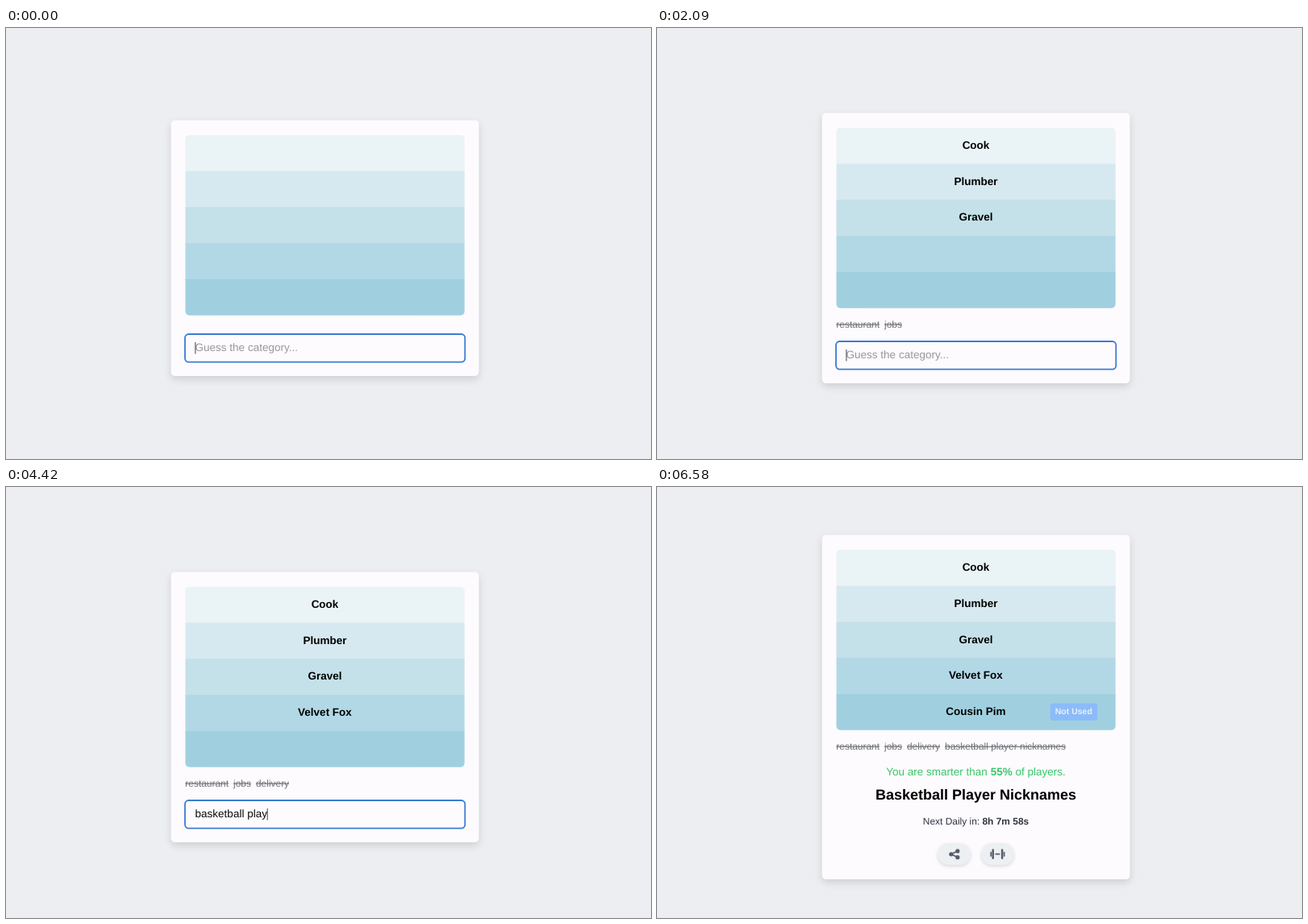
Recreate the animation shown at these times as an HTML page. Size 800 by 535 pixels, loop 6.61 s.

```html
<!DOCTYPE html>
<html lang="en">
<head>
<meta charset="utf-8">
<title>Guess the category</title>
<style>
  html, body { margin: 0; height: 100%; overflow: hidden; background: #edeef2; }
  svg { display: block; width: 100%; height: 100%; }
  text { font: 13.5px "Liberation Sans", Arial, sans-serif; white-space: pre; text-rendering: geometricPrecision; }
  .mid { text-anchor: middle; }
  .bold { font-weight: bold; }
  .small { font-size: 11.95px; }
  #card { fill: #fdfbfe; filter: drop-shadow(0 4px 5px rgba(0, 0, 0, .13)); }
  #guesses { fill: #70727a; }
  #guesses tspan { text-decoration: line-through; }
  .pill { fill: #edf0f2; filter: drop-shadow(0 2px 2px rgba(0, 0, 0, .13)); }
  .icon { fill: #575d6b; stroke: #575d6b; }
</style>
</head>
<body>
<svg viewBox="0 0 800 535">
  <clipPath id="round"><rect x="222.5" y="18.3" width="346.2" height="224" rx="5"/></clipPath>
  <g id="board">
    <rect id="card" x="204.7" width="381.8" rx="5"/>
    <g id="bands" clip-path="url(#round)"></g>
    <g id="clues"></g>
    <text id="guesses" class="small" x="222.3" y="266.5"></text>

    <g id="field">
      <rect x="222" width="347.3" height="34.6" rx="4.5" fill="#fdfbfe" stroke="#3c7cd3" stroke-width="1.8"/>
      <text id="typed" x="234.6" y="21.2"></text>
      <rect id="caret" y="10" width="1" height="14.5" fill="#444"/>
    </g>

    <g id="result">
      <rect x="487.7" y="209" width="58.6" height="21.2" rx="3" fill="#8cbbf9"/>
      <text class="mid bold" x="516.8" y="222.7" fill="#e8f0fc" style="font-size:10.5px">Not Used</text>
      <text class="mid" x="395.5" y="298.3" fill="#37c669">You are smarter than <tspan class="bold">55%</tspan> of players.</text>
      <text class="mid bold" x="395.5" y="328" style="font-size:18px">Basketball Player Nicknames</text>
      <text class="mid small" x="395.5" y="359.3" fill="#2f3540">Next Daily in: <tspan class="bold" id="timer"></tspan></text>
      <rect class="pill" x="348" y="382.5" width="41" height="27" rx="13.5"/>
      <rect class="pill" x="402" y="382.5" width="41" height="27" rx="13.5"/>
      <g class="icon" transform="translate(362 390)">
        <path d="M10.8 2.3L3 6.3L10.8 10.3" fill="none" stroke-width="1.7"/>
        <g stroke="none">
          <circle cx="10.8" cy="2.4" r="2.6"/>
          <circle cx="2.8" cy="6.3" r="2.6"/>
          <circle cx="10.8" cy="10.2" r="2.6"/>
        </g>
      </g>
      <g class="icon" transform="translate(422.4 396.2)" stroke-linecap="round">
        <path d="M-8.2 -2.2V2.2M8.2 -2.2V2.2" stroke-width="1.7"/>
        <path d="M-5.7 -5.1V5.1M5.7 -5.1V5.1" stroke-width="2.5"/>
        <path d="M-2.2 0H2.2" stroke-width="1.7"/>
      </g>
    </g>
  </g>
</svg>
<script>
const LOOP = 6610, BLINK = 250, TICK = 6095, CENTER = 395.5;
const ROW = 44.8, BANDS_TOP = 18.3;
const clues = ["Cook", "Plumber", "Gravel", "Velvet Fox", "Cousin Pim"];
const colors = ["#eaf3f6", "#d7e9f0", "#c4e0e9", "#b2d8e6", "#a0d0df"];
// start: first key, step: time per key, submit: enter
const guesses = [
  { text: "restaurant", start: 120, step: 52, submit: 800 },
  { text: "jobs", start: 1350, step: 50, submit: 1860 },
  { text: "delivery", start: 2130, step: 54, submit: 3150 },
  { text: "basketball player nicknames", start: 3690, step: 52, submit: 5470 }
];
const layouts = {
  empty: { top: 114.4, height: 317.6, field: 265.6 },
  playing: { top: 105.4, height: 335.5, field: 283.6 },
  done: { top: 59.5, height: 427.5, field: 0 }
};

const $ = id => document.getElementById(id);
const show = (el, on) => el.setAttribute("visibility", on ? "visible" : "hidden");

function add(parent, tag, attrs, text = "") {
  const el = document.createElementNS("http://www.w3.org/2000/svg", tag);
  for (const key in attrs) el.setAttribute(key, attrs[key]);
  el.textContent = text;
  return parent.appendChild(el);
}

function setText(el, text) {
  if (el.textContent !== text) el.textContent = text;
}

colors.forEach((fill, i) => add($("bands"), "rect",
  { x: 222, y: BANDS_TOP + i * ROW, width: 348, height: ROW + 1, fill }));
const clueEls = clues.map((word, i) => add($("clues"), "text",
  { class: "mid bold", x: CENTER, y: BANDS_TOP + 26.2 + i * ROW }, word));
const guessEls = guesses.map((g, i) => add($("guesses"), "tspan", { dx: i ? 6 : 0 }, g.text));

function draw(t) {
  const sent = guesses.filter(g => t >= g.submit).length;
  const done = sent === guesses.length;
  const layout = done ? layouts.done : sent ? layouts.playing : layouts.empty;
  $("board").setAttribute("transform", `translate(0 ${layout.top})`);
  $("card").setAttribute("height", layout.height);
  clueEls.forEach((el, i) => show(el, t >= (i ? guesses[i - 1].submit : 30)));
  guessEls.forEach((el, i) => show(el, i < sent));

  $("field").setAttribute("transform", `translate(0 ${layout.field})`);
  $("field").style.display = done ? "none" : "";
  show($("result"), done);
  setText($("timer"), t < TICK ? "8h 7m 59s" : "8h 7m 58s");
  if (done) return;

  const { text, start, step } = guesses[sent];
  const keys = Math.max(0, Math.min(text.length, Math.floor((t - start) / step) + 1));
  const lastEvent = keys ? start + (keys - 1) * step : sent ? guesses[sent - 1].submit : 0;
  const typed = $("typed");
  setText(typed, keys ? text.slice(0, keys) : "Guess the category...");
  typed.setAttribute("fill", keys ? "#0b0b0d" : "#97979c");
  $("caret").setAttribute("x", 234.4 + (keys ? typed.getComputedTextLength() : 0));
  show($("caret"), (t - lastEvent) % (2 * BLINK) < BLINK);
}

const begin = performance.now();
function frame() {
  draw((performance.now() - begin) % LOOP);
  requestAnimationFrame(frame);
}
frame();
</script>
</body>
</html>
```
